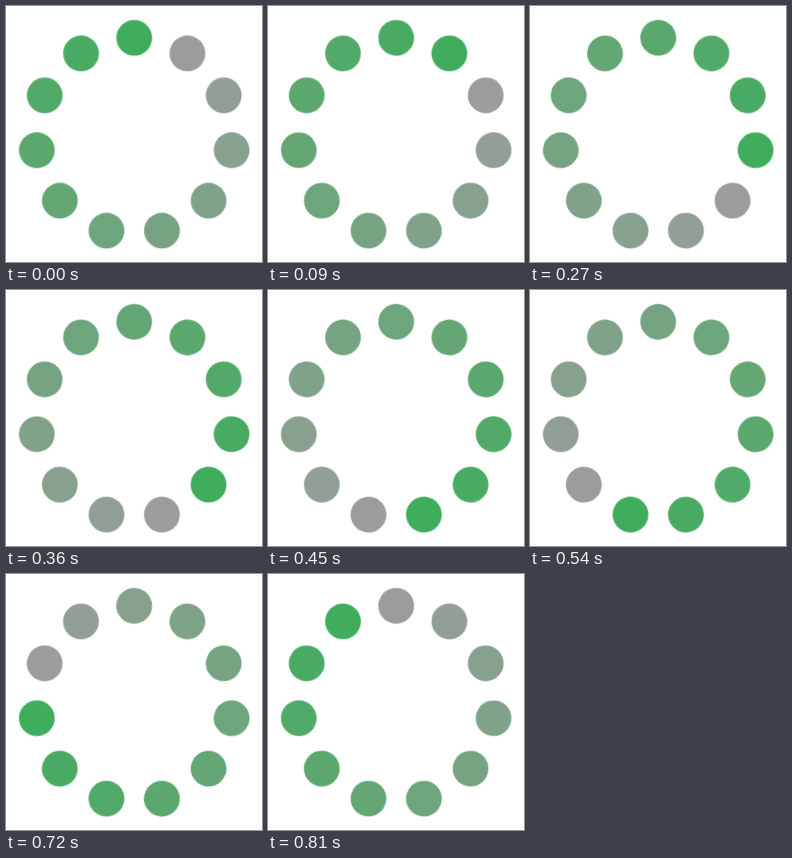
These frames come from a looping animation (256x256 px, 900 ms). An HTML page:

```html
<!DOCTYPE html>
<html lang="en">
<head>
<meta charset="utf-8">
<title>Loading ring</title>
<style>
  html, body { margin: 0; width: 100%; height: 100%; overflow: hidden; background: #fff; }
  svg { display: block; width: 100vw; height: 100vh; }
  #ring {
    --step: calc(360deg / 11);
    transform-origin: 0 0;
    animation: turn 900ms infinite;
  }
  /* One dot per tick; the last tick skips a dot. */
  @keyframes turn {
    0% { transform: rotate(0deg); animation-timing-function: steps(9, end); }
    89.99% { transform: rotate(calc(var(--step) * 9)); animation-timing-function: step-end; }
    90%, 100% { transform: rotate(calc(var(--step) * 10)); }
  }
</style>
</head>
<body>
<svg viewBox="0 0 256 256">
  <g transform="translate(128.2 130.2)"><g id="ring"></g></g>
</svg>
<script>
  const COUNT = 11, RADIUS = 98.4, DOT = 17.9;
  const HEAD = [64, 173, 93], TAIL = [154, 157, 154];
  const ring = document.getElementById('ring');

  for (let i = 0; i < COUNT; i++) {
    const angle = -i * 2 * Math.PI / COUNT;
    const fade = i / (COUNT - 1);
    const rgb = HEAD.map((c, k) => Math.round(c + (TAIL[k] - c) * fade));
    const dot = document.createElementNS('http://www.w3.org/2000/svg', 'circle');
    dot.setAttribute('cx', RADIUS * Math.sin(angle));
    dot.setAttribute('cy', -RADIUS * Math.cos(angle));
    dot.setAttribute('r', DOT);
    dot.setAttribute('fill', `rgb(${rgb})`);
    ring.append(dot);
  }
</script>
</body>
</html>
```
